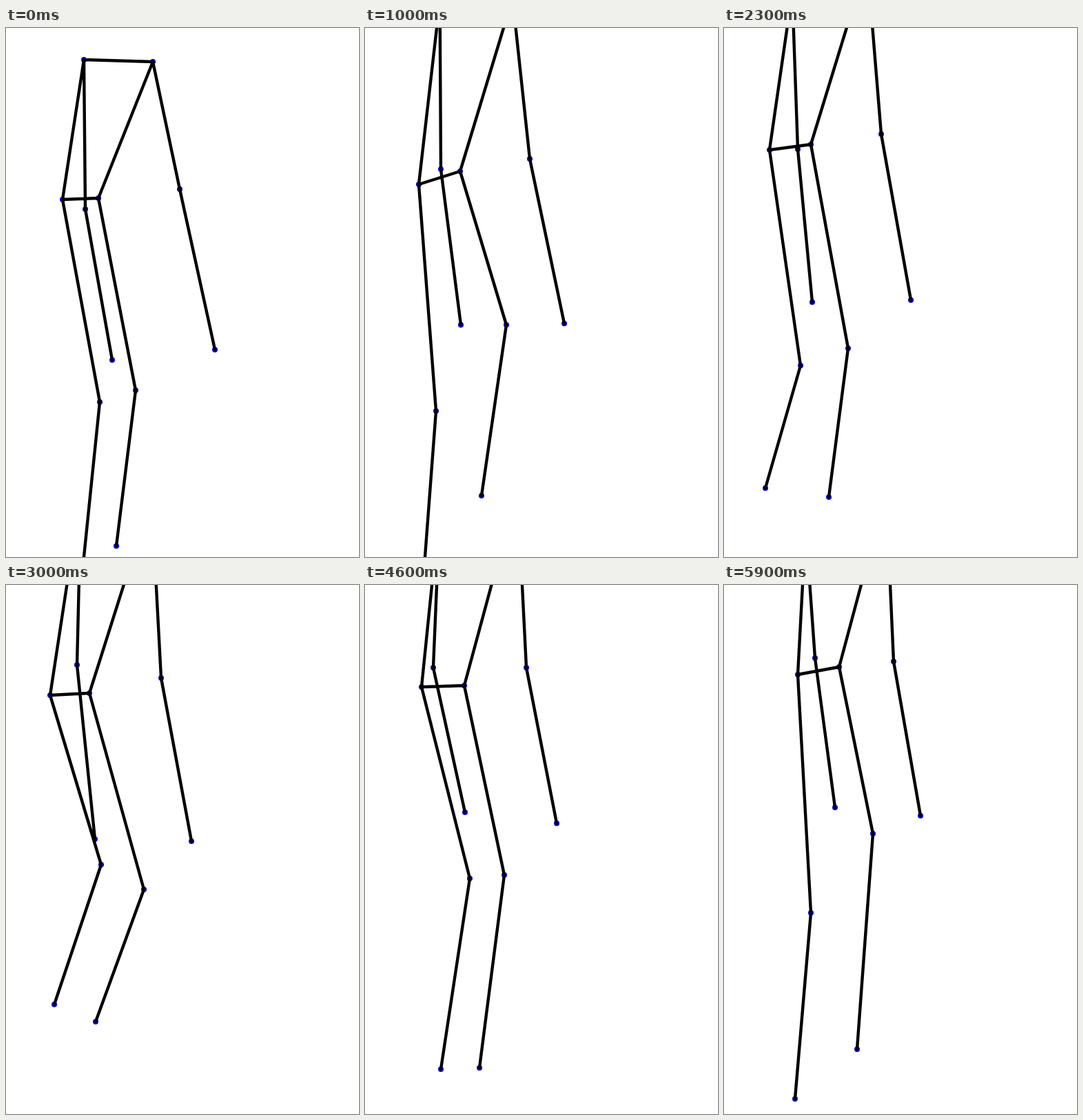
An HTML page with a canvas that plays this animation: 512x768 px, repeating every 6 s.

```html
<!DOCTYPE html>
<html lang="en">
<head>
<meta charset="utf-8">
<title>Walking stick figure</title>
<style>
  html, body { margin: 0; width: 100%; height: 100%; overflow: hidden; background: #fff; }
  canvas { display: block; }
</style>
</head>
<body>
<canvas id="stage" width="512" height="768"></canvas>
<script>
const LOOP = 6000;
const STEP = 100;
const POSE_TIMES = [0, 1000, 2300, 3000, 4000, 4600, 5900];

const ctx = document.getElementById('stage').getContext('2d');

// Pairs each pose with its time and merges in any in-between poses [time, x, y].
function track(poses, between = []) {
  return poses
    .map(([x, y], i) => [POSE_TIMES[i], x, y])
    .concat(between)
    .sort((a, b) => a[0] - b[0]);
}

const joints = {
  shoulderL: track([[113, 46], [108.6, -40], [99, -52], [109, -136], [102, -132], [109, -117], [118.5, -84]]),
  shoulderR: track([[213, 49], [214, -43], [207.5, -97], [211, -127], [211, -139], [221, -139], [235, -135]]),
  elbowL: track([[115, 263], [110, 205], [107, 176], [103, 116], [102, 111], [99, 120], [132, 106]]),
  elbowR: track([[252, 234], [239, 190], [228, 154], [225, 135], [225, 118], [234, 120], [246, 111]]),
  wristL: track([[154, 482], [139, 431], [128, 398], [129, 369], [137, 349], [145, 330], [161, 323]]),
  wristR: track([[303, 467], [289, 429], [271, 395], [269, 372], [273, 353], [278, 346], [285, 335]],
    [[300, 313, 456], [5300, 289, 340]]),
  hipL: track([[82, 249], [78, 227], [66, 177], [64, 160], [71, 150], [82, 148], [107, 130]]),
  hipR: track([[134, 247], [138, 208], [126, 169], [121, 157], [132, 150], [144, 146], [167, 119]]),
  kneeL: track([[136, 543], [103, 556], [111, 490], [138, 406], [142, 398], [152, 426], [126, 476]]),
  kneeR: track([[188, 526], [205, 431], [180, 465], [200, 442], [194, 405], [202, 421], [216, 361]]),
  ankleL: track([[110, 797], [84, 808], [60, 668], [70, 609], [98, 674], [110, 703], [103, 746]],
    [[2100, 55, 752], [5000, 107, 755]]),
  ankleR: track([[160, 752], [169, 679], [152, 681], [130, 634], [151, 709], [166, 701], [193, 674]],
    [[3500, 141, 655]])
};

const bones = [
  'shoulderL shoulderR', 'shoulderL hipL', 'shoulderR hipR', 'hipL hipR',
  'shoulderL elbowL', 'elbowL wristL', 'shoulderR elbowR', 'elbowR wristR',
  'hipL kneeL', 'kneeL ankleL', 'hipR kneeR', 'kneeR ankleR'
].map(pair => pair.split(' '));

function positionAt(keys, time) {
  const next = keys.findIndex(key => key[0] > time);
  if (next < 0) return keys[keys.length - 1].slice(1);
  const [t0, x0, y0] = keys[next - 1];
  const [t1, x1, y1] = keys[next];
  const k = (time - t0) / (t1 - t0);
  return [x0 + (x1 - x0) * k, y0 + (y1 - y0) * k];
}

function draw(time) {
  const pose = {};
  for (const name in joints) pose[name] = positionAt(joints[name], time);

  ctx.fillStyle = '#fff';
  ctx.fillRect(0, 0, 512, 768);

  ctx.fillStyle = '#0000d8';
  for (const [x, y] of Object.values(pose)) {
    ctx.beginPath();
    ctx.arc(x, y, 4, 0, Math.PI * 2);
    ctx.fill();
  }

  ctx.strokeStyle = '#000';
  ctx.lineWidth = 4.4;
  ctx.lineCap = 'round';
  ctx.beginPath();
  for (const [from, to] of bones) {
    ctx.moveTo(...pose[from]);
    ctx.lineTo(...pose[to]);
  }
  ctx.stroke();
}

const start = performance.now();

function tick() {
  const elapsed = (performance.now() - start) % LOOP;
  draw(Math.floor(elapsed / STEP) * STEP);
  requestAnimationFrame(tick);
}

tick();
</script>
</body>
</html>
```
